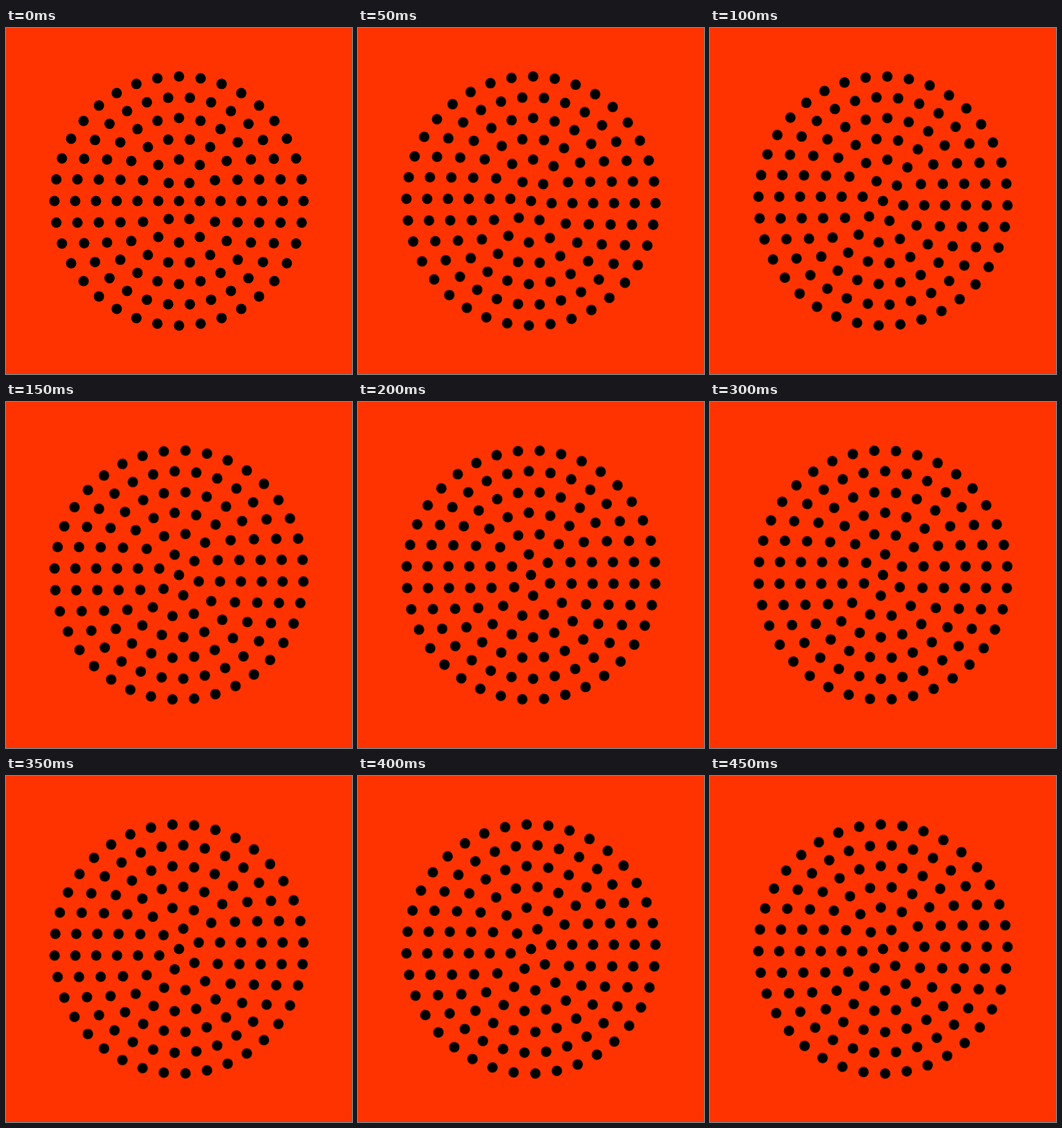
Recreate the animation shown at these times as an HTML page. Size 500 by 500 pixels, loop 500 ms.

```html
<!DOCTYPE html>
<html lang="en">
<head>
<meta charset="utf-8">
<title>Rotating dot rings</title>
<style>
  html, body { margin: 0; width: 100%; height: 100%; overflow: hidden; background: #ff3300; }
  svg { display: block; width: 100vw; height: 100vh; }
</style>
</head>
<body>
<svg viewBox="-250 -250 500 500"></svg>
<script>
const NS = 'http://www.w3.org/2000/svg';
const RINGS = 6, GAP = 30, DOT = 7.5, LOOP = 500, STEPS = 10;
const svg = document.querySelector('svg');

function add(parent, tag, attrs = {}) {
  const el = document.createElementNS(NS, tag);
  for (const name in attrs) el.setAttribute(name, attrs[name]);
  return parent.appendChild(el);
}

add(svg, 'circle', { r: DOT });

// Ring k holds 6k dots and turns by one dot spacing per loop.
for (let k = 1; k <= RINGS; k++) {
  const ring = add(svg, 'g');
  const count = 6 * k;
  for (let i = 0; i < count; i++) {
    const a = i / count * 2 * Math.PI;
    add(ring, 'circle', { cx: k * GAP * Math.cos(a), cy: k * GAP * Math.sin(a), r: DOT });
  }
  ring.animate(
    { transform: ['rotate(0deg)', `rotate(${360 / count}deg)`] },
    { duration: LOOP, iterations: Infinity, easing: `steps(${STEPS}, end)` }
  );
}
</script>
</body>
</html>
```
